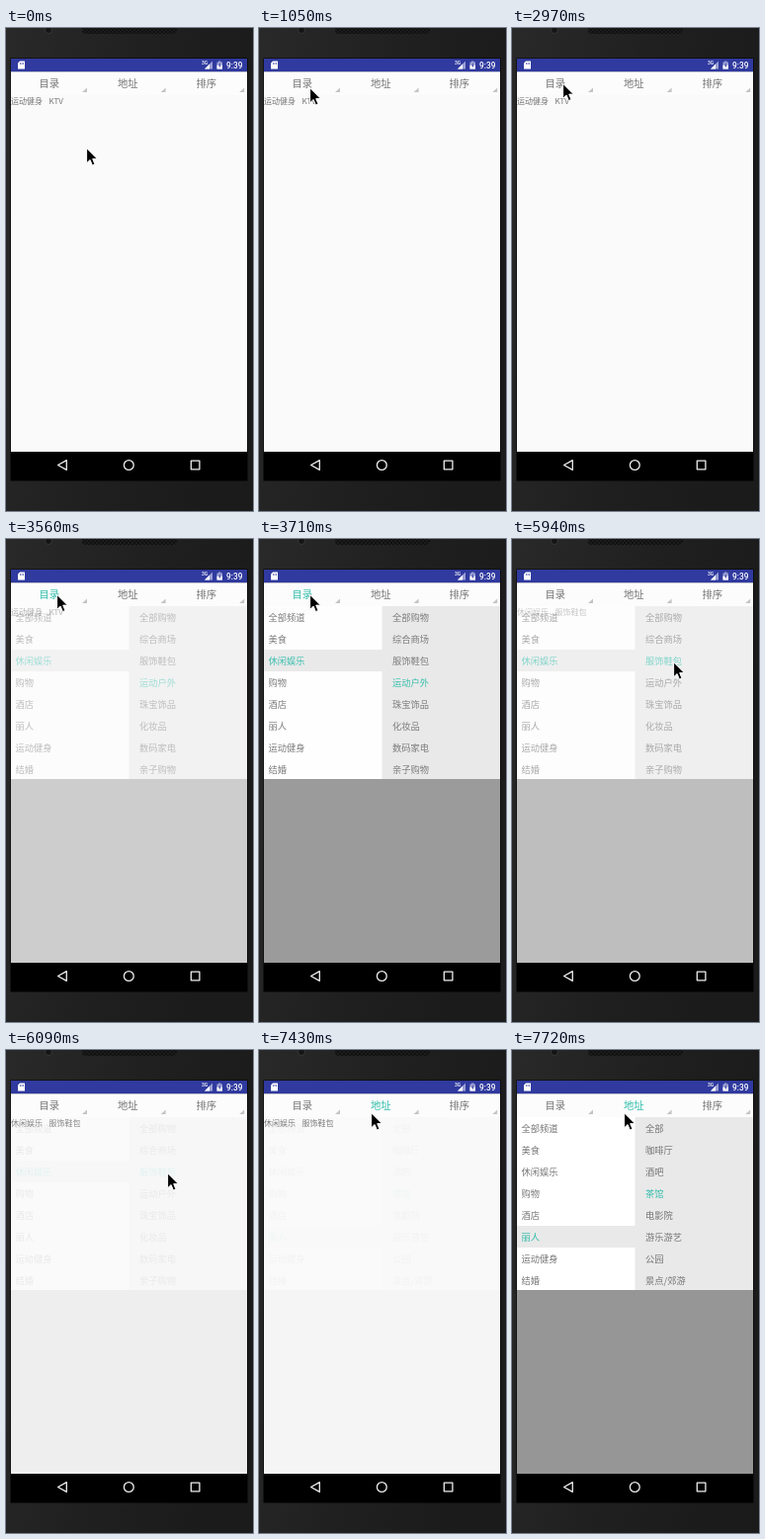
Write an HTML page that moves like this. It is 250 px wide and 489 px high and loops after 8 s.

```html
<!DOCTYPE html>
<html lang="zh-CN">
<head>
<meta charset="utf-8">
<style>
  html, body { margin: 0; width: 100%; height: 100%; overflow: hidden; background: #1e1e1e; }
  svg { display: block; width: 100vw; height: 100vh; }
  text { font-family: "Noto Sans CJK SC", "Noto Sans CJK", "Noto Sans", sans-serif; fill: #757575; }
  .tab { font-size: 10.3px; text-anchor: middle; }
  .row { font-size: 9.25px; }
  .page { font-size: 8px; }
  .status { font-family: Roboto, sans-serif; font-weight: 500; fill: #fff; }
  text.on { fill: #2fbcaa; }
</style>
</head>
<body>
<svg viewBox="0 0 250 489">
  <defs>
    <linearGradient id="body" x2="1" y2=".3">
      <stop stop-color="#292929"/><stop offset=".6" stop-color="#1f1f1f"/><stop offset="1" stop-color="#1b1b1b"/>
    </linearGradient>
    <pattern id="mesh" width="4" height="4" patternUnits="userSpaceOnUse">
      <rect width="4" height="4" fill="#101010"/><path d="M0 0L4 4M4 0L0 4" stroke="#222" stroke-width=".7"/>
    </pattern>
  </defs>

  <rect width="250" height="489" fill="url(#body)"/>
  <path d="M77 0H173V2Q173 6 169 6H81Q77 6 77 2Z" fill="url(#mesh)"/>
  <circle cx="43" cy="2" r="3.5" fill="#151515" stroke="#383838"/>
  <rect x="4.5" y="30.5" width="240" height="428" fill="#000"/>

  <rect x="5" y="31" width="239" height="13.5" fill="#303a9f"/>
  <path d="M14 33.5H19V41.5H12V35.5Z" fill="#fff"/>
  <path d="M14.5 35V37M16 35V37M17.5 35V37" stroke="#303a9f" stroke-width=".6"/>
  <text class="status" x="198" y="37.3" font-size="5">3G</text>
  <path d="M209 33.5V41.5H201Z" fill="#9aa0d3"/>
  <path d="M206 36.5V41.5H201Z" fill="#fff"/>
  <path d="M213.5 34.5H215V33.5H217.5V34.5H219V41.5H213.5Z" fill="#9aa0d3"/>
  <path d="M213.5 37.5H219V41.5H213.5Z" fill="#fff"/>
  <path d="M216.8 35L214.9 38.3H216.2L215.8 40.6L217.7 37.4H216.4Z" fill="#303a9f"/>
  <text class="status" x="223" y="40.9" font-size="8.3">9:39</text>

  <rect x="5" y="44.5" width="239" height="384.5" fill="#fafafa"/>
  <rect x="5" y="44.5" width="239" height="23.5" fill="#fcfcfc"/>
  <g id="popups"></g>
  <g id="tabs"></g>
  <text class="page" id="category" x="5" y="76.5"></text>
  <text class="page" id="item" x="43.5" y="76.5"></text>

  <g fill="none" stroke="#eee" stroke-width="1.3" stroke-linejoin="round">
    <path d="M61.3 437.6V447.4L52.6 442.5Z"/>
    <circle cx="124.3" cy="442.5" r="4.9"/>
    <rect x="187.3" y="438.2" width="8.6" height="8.6"/>
  </g>

  <path id="cursor" d="M.6 .8V15.8L4.1 12.5L6.4 18.1L9 17L6.7 11.6H11.4Z" fill="#000" stroke="#fff" stroke-width="1"/>
</svg>

<script>
const LOOP = 8000, ROW = 22, TOP = 68;
const $ = id => document.getElementById(id);

function add(parent, tag, attrs, text = '') {
  const node = document.createElementNS('http://www.w3.org/2000/svg', tag);
  for (const key in attrs) node.setAttribute(key, attrs[key]);
  node.textContent = text;
  return parent.appendChild(node);
}
const box = (parent, x, y, width, height, fill) => add(parent, 'rect', { x, y, width, height, fill });

const channels = '全部频道 美食 休闲娱乐 购物 酒店 丽人 运动健身 结婚'.split(' ');
const shopping = '全部购物 综合商场 服饰鞋包 运动户外 珠宝饰品 化妆品 数码家电 亲子购物'.split(' ');
const leisure = '全部 咖啡厅 酒吧 茶馆 电影院 游乐游艺 公园 景点/郊游'.split(' ');

const tabs = ['目录', '地址', '排序'].map((label, i) => {
  const right = 82 + i * 79.6;
  add($('tabs'), 'path', { d: `M${right} 60.5V65H${right - 5}Z`, fill: '#c4c4c4' });
  return add($('tabs'), 'text', { class: 'tab', x: 43.8 + i * 79.5, y: 60.3 }, label);
});

function makePopup(items, selected) {
  const group = add($('popups'), 'g', { opacity: 0 });
  add(group, 'rect', { x: 5, y: TOP, width: 239, height: 361, opacity: .4 });
  box(group, 5, TOP, 120, 175, '#fff');
  box(group, 124.5, TOP, 119.5, 175, '#e9e9e9');
  box(group, 5, TOP + selected * ROW, 120, ROW, '#e9e9e9');
  const column = (labels, x) => labels.map((label, i) =>
    add(group, 'text', { class: 'row', x, y: TOP + i * ROW + 14.5 }, label));
  column(channels, 9.5)[selected].classList.add('on');
  return { group, rows: column(items, 135) };
}
const catalog = makePopup(shopping, 2);
const address = makePopup(leisure, 5);

// Each step is [start time, values...] and holds until the next one.
const cursorSteps = [
  [0, 81, 121], [150, 70, 92], [300, 50, 74], [600, 50, 62], [1050, 51, 60], [2970, 51, 55.5],
  [4160, 50, 59], [4310, 67, 95], [4450, 125, 126], [4600, 156, 137], [5050, 161, 133],
  [5200, 162, 129], [5340, 162, 125], [5490, 163, 124], [6530, 158, 125], [6680, 118, 78], [6830, 113, 63]
];
const catalogFade = [[0, 0], [3560, .45], [3710, .95], [4160, 1], [5940, .6], [6090, .12], [6240, 0]];
const addressFade = [[0, 0], [7430, .05], [7570, .5], [7720, 1]];
const at = (steps, t) => steps.findLast(step => step[0] <= t).slice(1);

const highlight = (nodes, index) => nodes.forEach((node, i) => node.classList.toggle('on', i === index));

function render(t) {
  const chosen = t >= 5940;
  $('cursor').setAttribute('transform', `translate(${at(cursorSteps, t)})`);
  catalog.group.setAttribute('opacity', at(catalogFade, t)[0]);
  address.group.setAttribute('opacity', at(addressFade, t)[0]);
  highlight(tabs, t >= 7430 ? 1 : t >= 3560 && !chosen ? 0 : -1);
  highlight(catalog.rows, chosen ? 2 : 3);
  highlight(address.rows, 3);
  $('category').textContent = chosen ? '休闲娱乐' : '运动健身';
  $('item').textContent = chosen ? '服饰鞋包' : 'KTV';
  // Page text lies beneath an opened panel.
  const cover = Math.max(at(catalogFade, t)[0], at(addressFade, t)[0]);
  for (const id of ['category', 'item']) $(id).setAttribute('opacity', 1 - cover);
}

const start = performance.now();
function tick() {
  render((performance.now() - start) % LOOP);
  requestAnimationFrame(tick);
}
tick();
</script>
</body>
</html>
```
